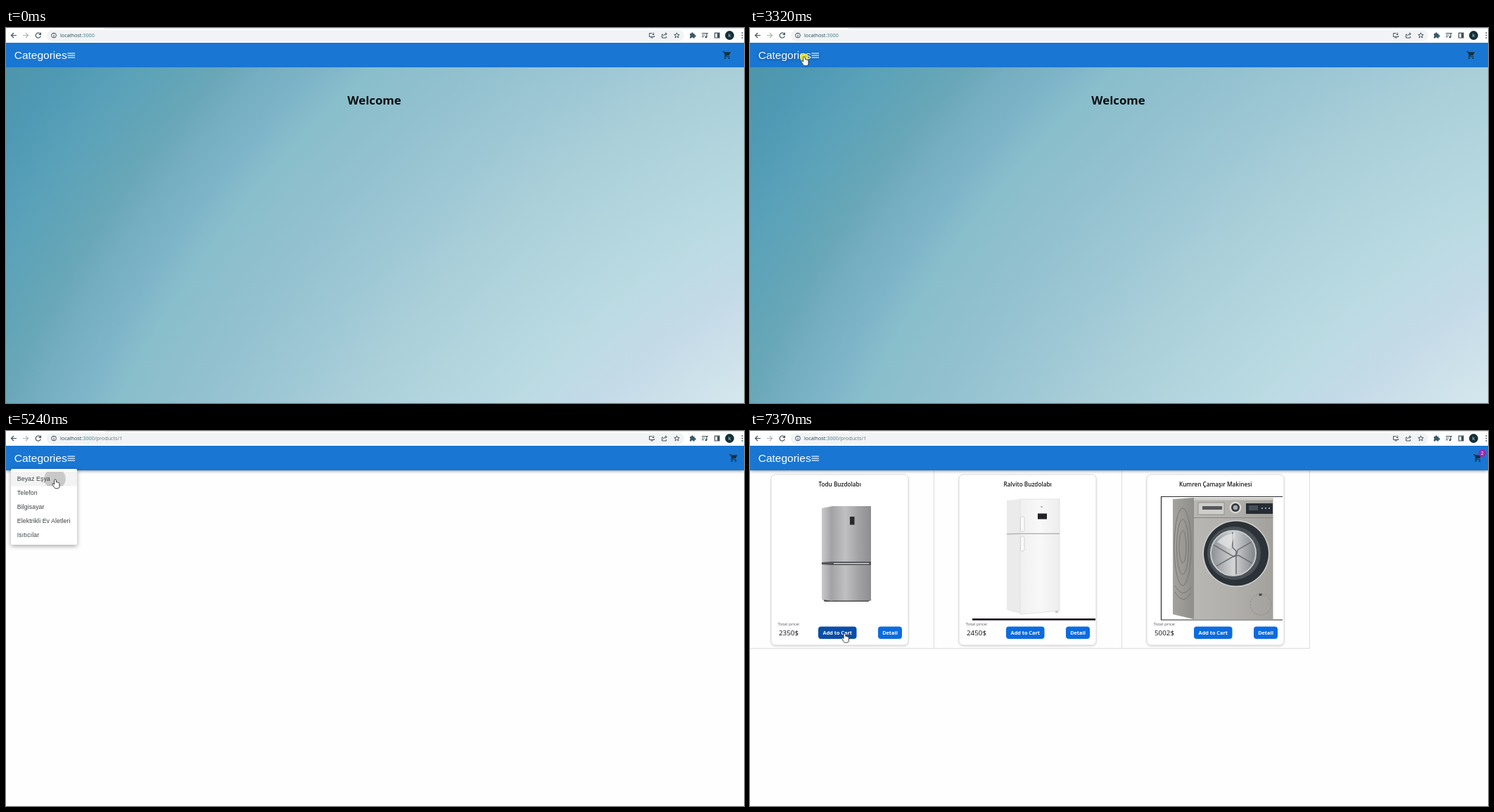
Animation, 1049 px wide and 534 px high, one loop 8000 ms. Source, as an HTML page:

```html
<!DOCTYPE html>
<html lang="tr">
<head>
<meta charset="utf-8">
<title>Shop demo</title>
<style>
  html, body { margin: 0; width: 100%; height: 100%; overflow: hidden; background: #fff; }
  svg { display: block; width: 1049px; height: 534px; }
  text { font-family: "Open Sans", "Noto Sans", sans-serif; white-space: pre; }
  .arial { font-family: "Liberation Sans", Arial, sans-serif; }
  .line { fill: none; stroke: #41515a; stroke-width: 1.2; }
  #paper { filter: drop-shadow(0 2px 3px rgba(0,0,0,.35)); }
  .card { filter: drop-shadow(0 1px 1px rgba(0,0,0,.16)); }
  #barShadow { filter: drop-shadow(0 1px 2px rgba(0,0,0,.45)); }
  #brand.hover { filter: drop-shadow(0 1px 2px rgba(0,40,100,.55)); }
</style>
</head>
<body>
<svg id="stage" viewBox="0 0 1049 534" xmlns="http://www.w3.org/2000/svg"></svg>
<script>
const LOOP = 8000;
const stage = document.getElementById('stage');

const text = (x, y, size, content, fill, extra = '') =>
  `<text x="${x}" y="${y}" font-size="${size}" fill="${fill}" ${extra}>${content}</text>`;
const rect = (x, y, w, h, fill, extra = '') =>
  `<rect x="${x}" y="${y}" width="${w}" height="${h}" fill="${fill}" ${extra}/>`;
const circle = (x, y, r, fill, extra = '') =>
  `<circle cx="${x}" cy="${y}" r="${r}" fill="${fill}" ${extra}/>`;
const path = (d, fill, extra = '') => `<path d="${d}" fill="${fill}" ${extra}/>`;
const line = (d, extra = '') => `<path d="${d}" class="line" ${extra}/>`;
const gradient = (id, ...colors) => `<linearGradient id="${id}">` + colors.map((c, i) =>
  `<stop offset="${i / (colors.length - 1)}" stop-color="${c}"/>`).join('') + '</linearGradient>';

// Distance from the gradient centre, colour
const SKY = [
  [827, '#d5e7ee'], [890, '#cde1ea'], [965, '#c4dae7'], [1030, '#bddbe4'], [1080, '#b8d9e1'],
  [1240, '#aacfd9'], [1320, '#9fc8d5'], [1440, '#92c0cf'], [1530, '#89becb'], [1580, '#7db4c8'],
  [1640, '#74acc0'], [1680, '#68a7b7'], [1780, '#59a1b9'], [1850, '#5099b4'], [1913, '#4d96ab']];

const defs = `<defs>
  <radialGradient id="sky" gradientUnits="userSpaceOnUse" cx="1534" cy="1204" r="1913">
    ${SKY.map(([d, c]) => `<stop offset="${d / 1913}" stop-color="${c}"/>`).join('')}
  </radialGradient>
  ${gradient('steel', '#a4a4a7', '#c0c0c2', '#a3a3a6', '#8e8e91')}
  ${gradient('steelSide', '#c9c9cb', '#a0a0a3')}
  ${gradient('white', '#f0f0f1', '#f8f8f9', '#ededee')}
  ${gradient('washer', '#b9b7b3', '#b1afab', '#a3a19c')}
  ${gradient('washerSide', '#a3a29e', '#8f8e8a')}
  ${gradient('glass', '#8b8e91', '#d3d5d6', '#7e8286')}
  <clipPath id="brandClip"><rect x="3" y="23" width="106" height="32" rx="3"/></clipPath>
  <clipPath id="itemClip"><rect x="7" y="58" width="94" height="20.5"/></clipPath>
</defs>`;

const browserBar = rect(0, 0, 1049, 21, '#fff') + rect(140, 0, 909, 1, '#dfe3e7') +
  rect(58, 3, 906, 15.5, '#f1f3f4', 'rx="7.7"') +
  line('M15 10.5H7.5M11 7L7.5 10.5 11 14') +
  line('M24 10.5H31.5M28 7L31.5 10.5 28 14', 'style="stroke:#a9b0b4"') +
  line('M48.6 8.3A3.6 3.6 0 1 0 49.3 11.4M49.4 6.5V9.3H46.6') +
  circle(68, 10.5, 3.4, 'none', 'stroke="#41515a"') + line('M68 10V12.6M68 8.2V9.2', 'style="stroke-width:1"') +
  text(77, 13.2, 7.26, 'localhost<tspan fill="#3f7d8c">:3000</tspan><tspan id="route" fill="#64747c"></tspan>', '#24465a') +
  line('M918 7.5H914.5V12.5H921.5V11M916.5 14H919.5M920 6.5V10M918.4 8.6L920 10.2 921.6 8.6', 'style="stroke-width:1"') +
  line('M934 9H932.5V14H938.5V12M934.5 11.5C935 9 936.5 8.5 939 8.5M937 6.5L939.3 8.5 937 10.5', 'style="stroke-width:1"') +
  line('M953.5 6.8L954.6 9.3 957.2 9.5 955.2 11.2 955.9 13.9 953.5 12.4 951.1 13.9 951.8 11.2 949.8 9.5 952.4 9.3Z', 'style="stroke-width:1"') +
  path('M972 8H974.2A1.3 1.3 0 1 1 976.6 8H978.8V10.2A1.3 1.3 0 1 1 978.8 12.4V14.4H976.6A1.2 1.2 0 0 0 974.2 14.4H972V12.2A1.2 1.2 0 0 0 972 10Z', '#3a5968') +
  line('M989 7.5H996M989 10H993.5M989 12.5H992M996 13V7.5H998') + circle(995, 13, 1.4, '#41515a') +
  line('M1007.5 7.2H1014V14H1007.5Z') + rect(1011, 7, 3, 7, '#41515a') +
  circle(1028.5, 10.5, 6.4, '#14313a') + text(1028.5, 13, 7, 'k', '#dfe8ea', 'text-anchor="middle"') +
  [7, 10.5, 14].map(y => circle(1046.5, y, .9, '#41515a')).join('');

const cartIcon = path('M7 18c-1.1 0-2 .9-2 2s.9 2 2 2 2-.9 2-2-.9-2-2-2zM1 2v2h2l3.6 7.6-1.4 2.4c-.9 1.6.4 3 1.8 3h12v-2H7.4l1-2h7.1c.8 0 1.4-.4 1.8-1l3.6-6.5c.4-.8-.2-1.5-.9-1.5H5.2l-.9-2zM17 18c-1.1 0-2 .9-2 2s.9 2 2 2 2-.9 2-2-.9-2-2-2z', '#15303d');

const appBar = `<g id="barShadow">${rect(0, 21, 1049, 35, '#1976d2')}</g>` +
  rect(0, 21, 1049, 35, '#1976d2') +
  `<g clip-path="url(#brandClip)">${circle(55, 39, 0, '#fff', 'id="brandRipple"')}</g>` +
  `<g id="brand">${text(11.7, 43.8, 15.5, 'Categories', '#fff', 'class="arial"')}
   ${[35.5, 38.5, 41.5].map(y => rect(87.5, y, 10.5, 1.1, '#fff')).join('')}</g>` +
  `<g id="cart"><g transform="translate(1018.3 32) scale(.55)">${cartIcon}</g></g>` +
  `<g id="badge">${circle(0, 0, 5.4, '#9c27b0')}${text(0, 2.4, 6.6, '', '#fff', 'id="count" class="arial" text-anchor="middle"')}</g>`;

const home = `<g id="home">${rect(0, 56, 1049, 478, 'url(#sky)')}
  ${text(523.5, 109, 16.8, 'Welcome', '#0a0e10', 'font-weight="700" text-anchor="middle"')}</g>`;

const steelFridge =
  path('M104 240H173L168 243H106Z', '#4c4c4e') +
  path('M102 110L117 107V242L102 240Z', 'url(#steelSide)') +
  rect(117, 107, 55, 134.5, 'url(#steel)') +
  path('M102 187L117 186H172V191H117L102 190Z', '#55565a') + rect(119, 188, 50, 1.3, '#d9dadc') +
  rect(142, 122, 6.5, 11.5, '#26282b');

const whiteFridge =
  path('M365 99L384 97V260L365 255Z', '#ebebec') +
  path('M384 97H440V256L384 261Z', 'url(#white)', 'stroke="#dedede" stroke-width=".8"') +
  path('M365 146L384 145.5H440V147H384L365 147.5Z', '#b5b5b7') +
  rect(409, 117.5, 13, 8, '#202225') + rect(413.5, 107, 2, 2, '#a0a0a3') +
  [[122, 21], [150, 21]].map(([y, h]) => rect(384.5, y, 5.5, h, '#fafafa', 'rx="2" stroke="#cfcfcf" stroke-width=".9"')).join('') +
  rect(434, 256, 4, 3, '#c9c9c9') + rect(316, 267, 175, 2.6, '#170f1a');

const washer =
  path('M757 93.5H584.5V269H757', 'none', 'stroke="#2b2b2d" stroke-width="1.2"') +
  path('M601 97L631 95V268L601 261Z', 'url(#washerSide)') +
  [5, 8.5, 12].map(r => `<ellipse cx="615" cy="165" rx="${r}" ry="${r * 4.6}" fill="none" stroke="#777672" stroke-width="1"/>`).join('') +
  path('M604 220Q615 240 627 222M604 229Q615 249 627 231', 'none', 'stroke="#787773"') +
  rect(631, 95, 112.5, 173.5, 'url(#washer)') + rect(631, 95, 112.5, 3.5, '#d0cecb') + rect(631, 123, 112.5, 1, '#858480') +
  rect(637, 102, 37, 17, '#cfcdca', 'stroke="#85847f" stroke-width=".8"') + rect(643, 107, 28, 5, '#53575b') +
  circle(690, 109, 8.5, '#d6d5d3') + circle(690, 109, 6, '#30363b') + circle(690, 109, 3.3, '#a9aaab') +
  rect(705, 103, 38, 15, '#262c33') + rect(709, 106, 13, 7, '#46505a') +
  [727, 732, 737].map(x => rect(x, 109, 2, 2, '#9aa3ab')).join('') +
  circle(691, 174.5, 47.5, '#d0d0ce') + circle(691, 174.5, 46, '#2c3338') + circle(688, 174, 38, '#4b5257') +
  circle(687, 174, 32, 'url(#glass)', 'stroke="#c9cccd" stroke-width="2"') +
  [0, 60, 120].map(a => path('M686 144V166L691 171V204', 'none', `stroke="#6a6e72" stroke-width="1.5" transform="rotate(${a} 687 174)"`)).join('') +
  path('M664 158Q674 146 690 146L682 168Z', '#e6e8e8', 'opacity=".7"') +
  rect(723.5, 231.5, 4, 3, '#34373a') + circle(726, 247, 15, 'none', 'stroke="#8d8b87" stroke-width=".9" stroke-dasharray="3 1.5"');

const button = (x, w, label, id = '') => rect(x, 278.5, w, 17.5, '#0b6be0', `rx="4" ${id}`) +
  text(x + w / 2, 290, 7.3, label, '#fff', 'font-weight="700" text-anchor="middle"');

const card = (name, price, i) => `<g transform="translate(${267 * i} 0)">
  ${rect(30, 62, 195, 243, '#fff', 'rx="6" stroke="#dcdcdc" stroke-width="1" class="card"')}
  ${text(127.7, 79.2, 8.2, name, '#15181a', 'font-weight="600" text-anchor="middle"')}
  ${text(39.5, 277.3, 6.15, 'Total price:', '#50555a')}
  ${text(41, 290.6, 9.8, price, '#101214', 'font-weight="500"')}
  ${button(97, 54.5, 'Add to Cart', i ? '' : 'id="add"')}${button(182, 34, 'Detail')}
  ${rect(261, 56, 1, 254, '#dedede')}</g>`;

const products = `<g id="products">${[
    ['Todu Buzdolabı', '2350$'], ['Ralvito Buzdolabı', '2450$'], ['Kumren Çamaşır Makinesi', '5002$']
  ].map(([name, price], i) => card(name, price, i)).join('')}
  ${rect(0, 309, 796, 1, '#dedede')}${steelFridge}${whiteFridge}${washer}</g>`;

const menu = `<g id="menu">${rect(7, 54, 94, 108, '#fff', 'rx="2" id="paper"')}
  ${rect(7, 58, 94, 20.5, '#f3f3f3', 'id="itemHover"')}
  <g clip-path="url(#itemClip)">${circle(69.5, 68, 0, '#000', 'id="itemRipple"')}</g>
  ${['Beyaz Eşya', 'Telefon', 'Bilgisayar', 'Elektrikli Ev Aletleri', 'Isıtıcılar'].map((label, i) =>
    text(15.8, 71.2 + 19.85 * i, 8.75, label, '#3c3f42', 'class="arial" letter-spacing=".08"')).join('')}</g>`;

const cursor = `<g id="cursor">${circle(0, 1, 6, '#f4ee2e', 'id="press" opacity=".85"')}
  ${path('M0 0V11.5L2.7 9 4.4 12.8 6.2 12 4.5 8.3H8Z', '#fff', 'id="arrow" stroke="#222" stroke-width=".8"')}
  ${path('M0 0c-1 0-1.4.6-1.4 1.4v5.6l-1.2-1c-.9-.7-2 .2-1.4 1.2l2.6 4.2c.7 1.1 1.4 1.4 2.4 1.4h2.2c1.8 0 2.8-1.2 2.8-3V6.2c0-1-.6-1.5-1.3-1.4-.3-.7-1.2-.9-1.7-.5-.3-.6-1-.8-1.6-.5V1.4C1.4.6 1 0 0 0z', '#fff', 'id="hand" stroke="#222" stroke-width=".9"')}</g>`;

stage.innerHTML = defs + rect(0, 0, 1049, 534, '#fefefe') + products + appBar + home + browserBar + menu + cursor;

const el = {};
stage.querySelectorAll('[id]').forEach(node => el[node.id] = node);

// Time, x, y of the pointer tip
const POINTER = [
  [230, 1029, 522], [520, 907, 289], [700, 914, 233], [970, 914, 233], [1240, 319, 146],
  [1510, 319, 146], [2010, 77, 41], [3450, 77, 41], [3585, 78.5, 62.5], [3660, 78.5, 62.5],
  [3860, 71.5, 75.5], [4120, 71.5, 75.5], [4250, 70, 69], [5440, 70, 69], [5910, 138, 269],
  [5980, 138, 269], [6150, 134.5, 288.5], [LOOP, 134.5, 288.5]];
const PRESSES = [[3320, 3450], [5120, 5240], [6640, 6770], [7240, 7370]];

const progress = (t, from, to) => Math.min(1, Math.max(0, (t - from) / (to - from)));
const smooth = p => p * p * (3 - 2 * p);
const between = (t, from, to) => t >= from && t < to;
const show = (node, visible) => node.setAttribute('display', visible ? 'inline' : 'none');
const setCircle = (node, r, opacity) => { node.setAttribute('r', r); node.setAttribute('opacity', opacity); };

function pointerAt(t) {
  const i = Math.max(1, POINTER.findIndex(key => key[0] > t));
  const [t0, x0, y0] = POINTER[i - 1], [t1, x1, y1] = POINTER[i];
  const p = smooth(progress(t, t0, t1));
  return [x0 + (x1 - x0) * p, y0 + (y1 - y0) * p];
}

function drawPointer(t) {
  const hand = between(t, 1880, 5500) || t >= 6040;
  show(el.cursor, t >= 230);
  el.cursor.setAttribute('transform', `translate(${pointerAt(t)})`);
  show(el.hand, hand);
  show(el.arrow, !hand);
  show(el.press, PRESSES.some(([from, to]) => between(t, from, to)));
}

function drawMenu(t) {
  const open = smooth(progress(t, 3440, 3690));
  const close = progress(t, 5310, 5410);
  const fade = t < 5310 ? open : Math.max(0, 1 - close * 1.04);
  const grow = smooth(progress(t, 3440, 3590));
  const shrink = .018 * smooth(progress(t, 5330, 5380)) + .2 * progress(t, 5385, 5450);
  const sx = (.75 + .25 * grow) * (1 - shrink * .7), sy = (.56 + .44 * grow) * (1 - shrink);
  show(el.menu, between(t, 3440, 5480));
  el.menu.setAttribute('opacity', t < 5310 ? fade : Math.max(.27 * (1 - progress(t, 5440, 5500)), fade));
  el.menu.setAttribute('transform', `translate(7 54) scale(${sx} ${sy}) translate(-7 -54)`);
  show(el.itemHover, t >= 3540);
  const spread = progress(t, 5240, 5380);
  setCircle(el.itemRipple, t < 5200 ? 0 : 15 + 31 * spread, .17 + .2 * spread);
}

function drawBar(t) {
  el.brand.classList.toggle('hover', between(t, 1950, 3450));
  const spread = progress(t, 3340, 3590);
  setCircle(el.brandRipple, between(t, 3340, 3840) ? 33 * spread : 0, .13 * (1 - progress(t, 3680, 3840)));
  const atProducts = t >= 5240;
  show(el.barShadow, atProducts);
  el.cart.setAttribute('transform', `translate(${atProducts ? 9.5 : 0} 0)`);
  el.badge.setAttribute('transform', `translate(1040.8 31.6) scale(${smooth(progress(t, 6700, 6900))})`);
  el.count.textContent = t < 7310 ? 1 : 2;
  el.route.textContent = atProducts ? '/products/1' : '';
}

function frame() {
  const t = performance.now() % LOOP;
  show(el.home, t < 5240);
  show(el.products, t >= 5320);
  el.add.setAttribute('fill', t >= 6040 ? '#0a4ea8' : '#0b6be0');
  drawBar(t);
  drawMenu(t);
  drawPointer(t);
  requestAnimationFrame(frame);
}
frame();
</script>
</body>
</html>
```
